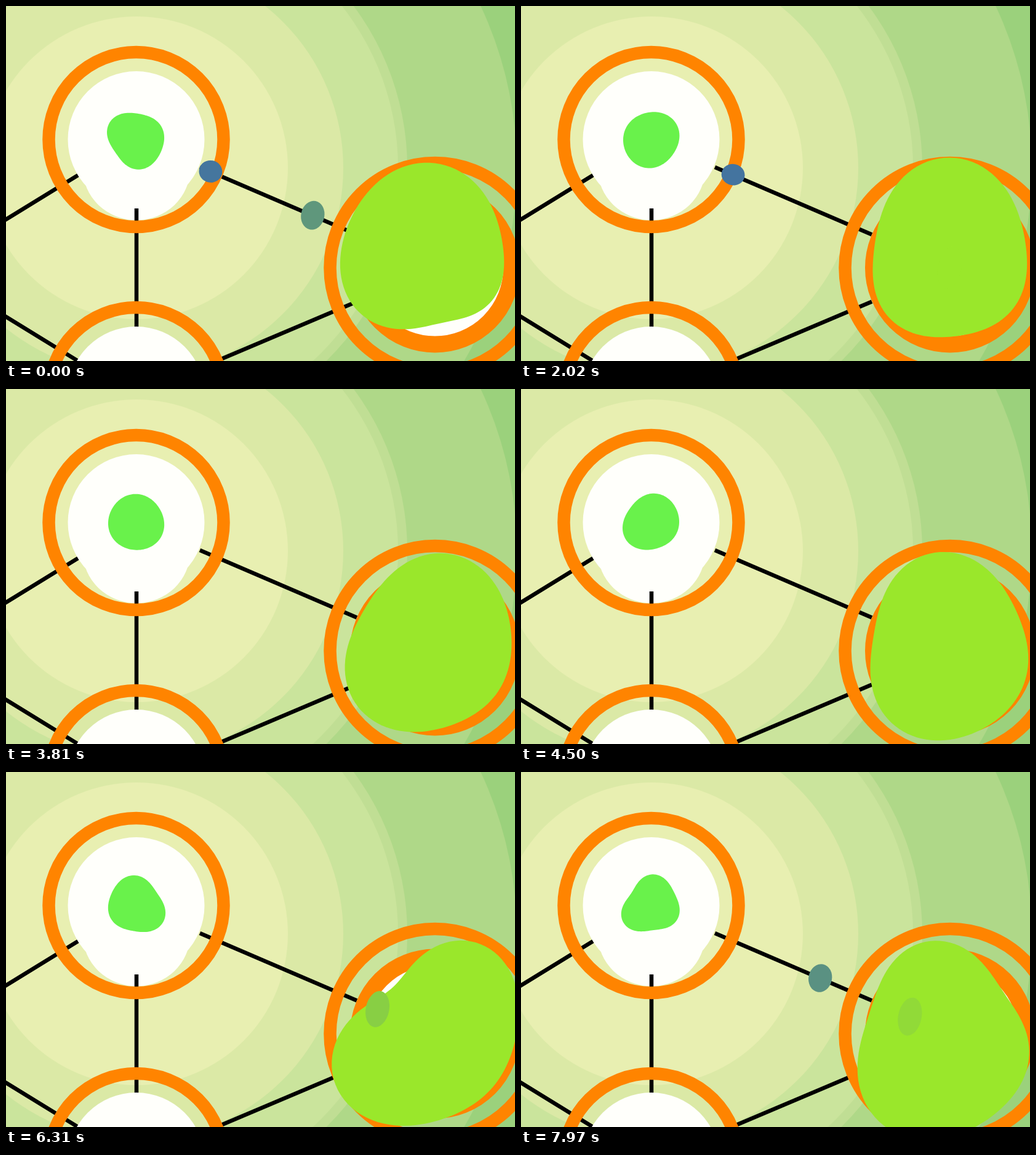
These frames come from a looping animation (827x577 px, 8000 ms). An HTML page with a canvas:

```html
<!DOCTYPE html>
<html lang="en">
<head>
<meta charset="utf-8">
<title>Cells exchanging signals</title>
<style>
html, body { margin: 0; width: 100%; height: 100%; overflow: hidden; background: #9bd17c; }
canvas { display: block; }
</style>
</head>
<body>
<canvas id="stage" width="827" height="577"></canvas>
<script>
const ctx = document.getElementById('stage').getContext('2d');
const LOOP = 8, TRAVEL = 1.2, TAU = Math.PI * 2;
const ORANGE = '#ff8400', WHITE = '#fffffb';
const LIME = [154, 231, 43], GREEN = [105, 242, 75], BLUE = [68, 115, 160];
const small = { x: 211.5, y: 217 }, lower = { x: 211.5, y: 632 }, large = { x: 697, y: 425.5 };

// Seconds at which a signal leaves the large cell.
const departures = [-0.9, -0.49, 0.08, 0.4, 1.15, 2.02, 6.08, 7.45, 7.81];

const mix = (a, b, p) => a + (b - a) * p;
const rgb = color => `rgb(${color.map(Math.round)})`;
const blend = (a, b, p) => rgb(a.map((v, i) => mix(v, b[i], p)));
const wave = (t, period) => Math.cos(TAU * t / period);

function ellipse(x, y, rx, ry, fill, tilt = 0) {
  ctx.beginPath();
  ctx.ellipse(x, y, rx, ry, tilt, 0, TAU);
  ctx.fillStyle = fill;
  ctx.fill();
}

const disc = (c, r, fill) => ellipse(c.x, c.y, r, r, fill);

function ring(c, r, width) {
  ctx.beginPath();
  ctx.arc(c.x, c.y, r, 0, TAU);
  ctx.lineWidth = width;
  ctx.strokeStyle = ORANGE;
  ctx.stroke();
}

function line(x1, y1, x2, y2) {
  ctx.beginPath();
  ctx.moveTo(x1, y1);
  ctx.lineTo(x2, y2);
  ctx.lineWidth = 6.5;
  ctx.strokeStyle = '#000';
  ctx.stroke();
}

function blob(c, radius, color) {
  ctx.beginPath();
  for (let a = 0; a < TAU; a += TAU / 120) {
    const r = radius(a);
    ctx.lineTo(c.x + r * Math.cos(a), c.y + r * Math.sin(a));
  }
  ctx.fillStyle = rgb(color);
  ctx.fill();
}

function drawScene() {
  ctx.fillStyle = '#9bd17c';
  ctx.fillRect(0, 0, 827, 577);
  const bands = [[618, '#afd888'], [440, '#c0de94'], [425, '#cae49c'], [336, '#dbe9a6'], [246, '#e8efb1']];
  for (const [r, fill] of bands) disc({ x: 212, y: 263 }, r, fill);

  ellipse(212, 265, 87, 83, WHITE);
  line(117, 275, -10, 353);
  line(-10, 499, 117, 577);
  line(212, 329, 212, 522);
  line(315, 262, 570, 371.5);
  line(315, 588.5, 570, 480.5);

  for (const cell of [small, lower]) {
    disc(cell, 111, WHITE);
    ring(cell, 142, 20.5);
  }
  disc(large, 112, WHITE);
  ring(large, 124.5, 27);
  ring(large, 170.5, 20.5);
}

// Each outline is a circle bent by drift, stretch and three-lobed waves.
function drawBlobs(t) {
  const sway = wave(t, 3.12), bounce = wave(t, 2.05), swell = wave(t, 21.2);
  blob(small, a => 45.5 + 3 * sway * Math.sin(2 * a) + (t - 3) * Math.sin(3 * a), GREEN);

  const dx = -8 - 13 * swell * sway, dy = -31 * swell * bounce;
  blob(large, a => 132 + 1.7 * t
    + dx * Math.cos(a) + dy * Math.sin(a)
    + (7 * sway - 6) * Math.cos(2 * a) - 2.2 * t * (1 + sway) * Math.sin(2 * a)
    - 1.1 * t * sway * Math.cos(3 * a) + 4 * (1 + bounce) * Math.sin(3 * a), LIME);
}

// u is the distance from the small cell: 0 there, 1 at the large cell.
function signalColor(u) {
  const peak = 0.35;
  if (u < peak) return blend(GREEN, BLUE, 1 - (1 - u / peak) ** 3);
  const p = (1 - u) / (1 - peak);
  return blend(LIME, BLUE, p * p * (3 - 2 * p));
}

function drawSignals(t) {
  for (const start of departures) {
    const u = 1 - (t - start) / TRAVEL;
    if (u <= 0 || u >= 1) continue;
    const height = 16 + 28 * Math.abs(u - 0.32);
    ellipse(mix(small.x, large.x, u), mix(small.y, large.y, u), 19, height, signalColor(u), 0.2);
  }
}

function frame() {
  const t = performance.now() / 1000 % LOOP;
  drawScene();
  drawBlobs(t);
  drawSignals(t);
  requestAnimationFrame(frame);
}
frame();
</script>
</body>
</html>
```
